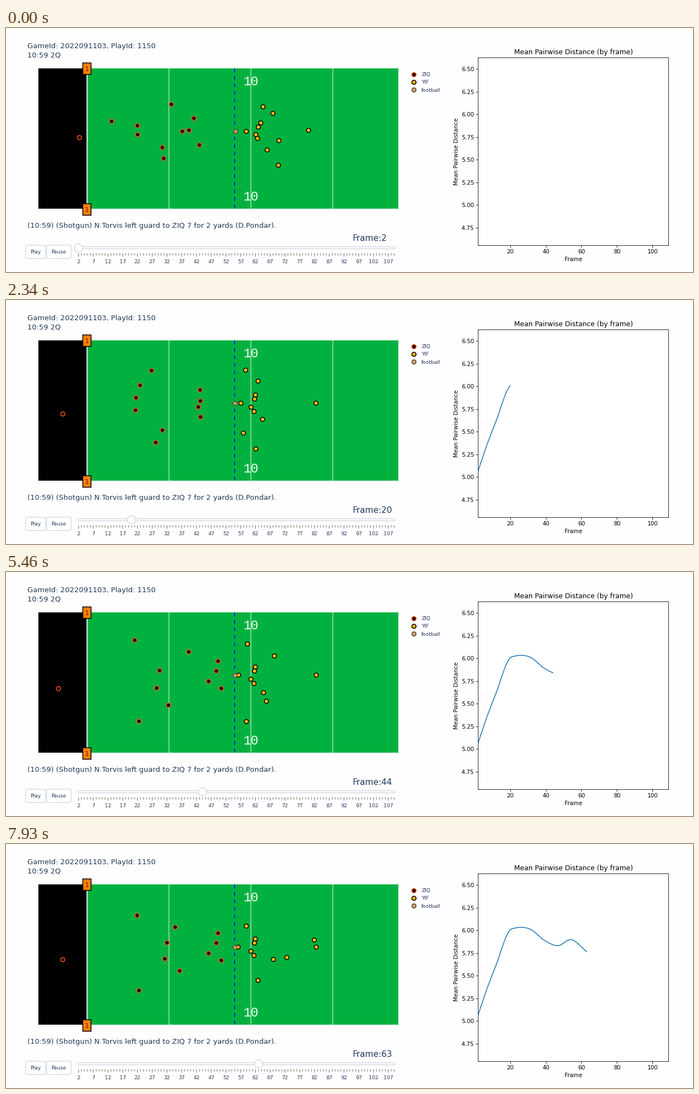
Animation of 1252 by 447 pixels, one loop 8 s. Source, as a matplotlib script:

```python
import numpy as np
import matplotlib.pyplot as plt
from matplotlib.animation import FuncAnimation
from matplotlib.patches import Circle, FancyBboxPatch, Rectangle

W, H, DPI = 1252, 447, 64
PX = 72 / DPI                     # points per pixel
SHIFT = 0.6                       # pixel alignment of the drawing
LOOP, TICK, HOLD = 8000, 50, 130  # loop, timer interval, time per pose (ms)

INK, RIM = "#22375a", "#bec8d9"
HOME = ("black", "#fb4f14")       # fill, outline
AWAY = ("#ffb612", "black")
BALL = ("#cba46f", "#5b4a33")

for key in ("font.size", "axes.linewidth", "axes.labelpad", "axes.titlepad",
            "lines.linewidth", "xtick.major.size", "xtick.major.width",
            "xtick.major.pad", "ytick.major.size", "ytick.major.width",
            "ytick.major.pad"):
    plt.rcParams[key] *= 1.162
plt.rcParams["font.family"] = "DejaVu Sans"

fig = plt.figure(figsize=(W / DPI, H / DPI), dpi=DPI, facecolor="#fefefe")
ax = fig.add_axes([0, 0, 1, 1])
ax.set(xlim=(SHIFT, W + SHIFT), ylim=(H + SHIFT, SHIFT))
ax.axis("off")


def text(x, y, s, size, color=INK, **kw):
    return ax.text(x, y, s, fontsize=size * PX, color=color, **kw)


def rect(x0, y0, x1, y1, fill, edge="none", lw=0, z=1):
    ax.add_patch(Rectangle((x0, y0), x1 - x0, y1 - y0, fc=fill, ec=edge,
                           lw=lw * PX, zorder=z))


def rounded(x, y, w, h, fill):
    ax.add_patch(FancyBboxPatch((x, y), w, h, fc=fill, ec=RIM, lw=0.9 * PX,
                                boxstyle="round,pad=0,rounding_size=1.6"))


def line(x0, y0, x1, y1, color, lw, **kw):
    ax.plot([x0, x1], [y0, y1], color=color, lw=lw * PX, snap=False, **kw)


def dots(xy, style):
    # one fill per dot keeps sub-pixel positions
    x, y = np.transpose(xy)
    return ax.scatter(x, y, s=(7.7 * PX) ** 2, c=[style[0]] * len(x),
                      edgecolors=style[1], linewidths=1.54 * PX, zorder=4)


def smooth(t, v, q):
    """Cubic Hermite curve through the points v at times t, read at q."""
    t, v = np.array(t, float), np.array(v, float).reshape(len(t), -1)
    m = np.gradient(v, t, axis=0)
    i = np.clip(np.searchsorted(t, q, side="right") - 1, 0, len(t) - 2)
    h = (t[i + 1] - t[i])[:, None]
    u = (q - t[i])[:, None] / h
    return ((1 + 2 * u) * (1 - u) ** 2 * v[i] + u * (1 - u) ** 2 * h * m[i]
            + u * u * (3 - 2 * u) * v[i + 1] + u * u * (u - 1) * h * m[i + 1])


step = np.arange(62)
number = step + 2


# Three ways to move: run a route, push forward, or drop into place
def route(*points):
    return smooth((0, 12, 36, 61), points, step)


def push(a, b, t0, t1):
    u = np.clip((step - t0) / (t1 - t0), 0, 1)[:, None]
    return np.array(a) + u * u * (3 - 2 * u) * np.subtract(b, a)


def settle(a, b, tau=5):
    return np.array(b) + np.exp(-step / tau)[:, None] * np.subtract(a, b)


home = np.array([
    route((193, 171.5), (220, 161.5), (329, 147), (309, 153)),
    route((240, 179.5), (232, 179.5), (274, 181), (294, 181.5)),
    route((240.5, 196), (232, 199.5), (269, 212.5), (290, 211)),
    route((302, 140.5), (277.5, 133), (238, 125), (239.5, 131.5)),
    route((285.5, 219.5), (285, 234), (292, 246), (317, 233)),
    route((288, 239.5), (281, 255.5), (246, 273.5), (243, 269)),
    route((134.5, 201.5), (111.5, 207), (96, 214), (104, 212.5)),
    push((343, 166), (387, 164), 8, 38),
    push((322, 190), (370, 201), 2, 30),
    push((334, 188), (384, 182), 2, 38),
    push((353, 215), (393, 214), 14, 42),
])
away = np.array([
    route((469, 145), (442.5, 132.5), (441, 129), (438.5, 151)),
    route((487, 157), (464.5, 151), (474, 150), (562.5, 176.5)),
    route((498, 207), (474.5, 216), (467, 223), (488, 212)),
    route((476.5, 224), (436.5, 240), (465, 243), (512.5, 208.5)),
    route((497, 252), (467.5, 268), (437, 278.5), (460, 250.5)),
    settle((465, 174.5), (455, 174.5)),
    settle((460.5, 182), (453.5, 182)),
    settle((456, 196), (447, 197)),
    settle((459, 203), (452.5, 205)),
    settle((438.5, 190), (423, 189.5), 18),
    settle((552, 188), (566, 189.5)),
])
ball = settle((419, 189.5), (417.3, 189.5), 14)[None]

# Field
TOP, BOTTOM = 74.5, 332
rect(60, TOP, 715.5, BOTTOM, "#00b140")
rect(60, TOP, 148, BOTTOM, "black")
for k in (1, 2, 3):
    line(148.3 + 149.3 * k, TOP, 148.3 + 149.3 * k, BOTTOM, "#f0faf3", 1)
line(148.3, TOP, 148.3, BOTTOM, "white", 1.8)
line(417.2, TOP, 417.2, BOTTOM, "blue", 1.54, ls=(0, (4.5, 4.5)))
for y in (97, 308):
    text(447, y, "10", 23.1, "white", ha="center", va="center_baseline",
         family="Liberation Mono")
for y in (75.5, 333.5):
    rect(141, y - 10.5, 156, y + 10.5, "#ff7f0e", "black", 1.5, 3)
    text(148.4, y + 4.2, "1", 11.5, "#4d2a0a", ha="center", zorder=4)

# Headings and legend
text(40, 37.4, "GameId: 2022091103, PlayId: 1150", 13.08)
text(40, 53.7, "10:59 2Q", 13.08)
text(40, 366.9, "(10:59) (Shotgun) N.Torvis left guard to ZIQ 7 for 2 yards (D.Pondar).",
     13.08)
for k, (name, style) in enumerate((("ZIQ", HOME), ("YIF", AWAY), ("football", BALL))):
    y = 85.5 + 14.1 * k
    dots([(743.5, y)], style)
    text(757.8, y + 3.4, name, 9.24)


# Buttons and slider
def slide(n):
    return 132.7 + (n - 2) * 5.376


for x, w, name in ((36.5, 36, "Play"), (74.5, 44.5, "Pause")):
    rounded(x, 398.5, w, 24.5, "white")
    text(x + w / 2, 413.8, name, 9.24, ha="center")
rounded(131, 401.3, 578.5, 4, "#f8fafc")
for n in range(2, 110):
    major = n % 5 == 2
    line(slide(n), 413.8, slide(n), 419 if major else 416.9, "#333333", 0.77)
    if major:
        text(slide(n), 431.3, str(n), 9.24, ha="center")

# Chart
chart = fig.add_axes([(861 - SHIFT) / W, 1 - 398 / H, 347 / W, 344 / H])
chart.set(xlim=(2, 109), ylim=(4.558, 6.626), xlabel="Frame",
          ylabel="Mean Pairwise Distance", title="Mean Pairwise Distance (by frame)",
          xticks=range(20, 101, 20), yticks=np.arange(4.75, 6.51, 0.25))
mean = smooth((2, 7, 12, 20, 23, 31, 40, 47, 54, 63),
              (5.07, 5.357, 5.613, 6.005, 6.026, 6.015, 5.88, 5.831, 5.898, 5.765),
              number)

# Moving parts
groups = [(dots(path[:, 0], style), path)
          for path, style in ((home, HOME), (away, AWAY), (ball, BALL))]
groups[-1][0].set_alpha(0.9)
knob = ax.add_patch(Circle((slide(2), 403.4), 7.5, fc="white", ec=RIM,
                           lw=0.9 * PX, zorder=5))
label = text(632, 390.2, "", 15.4)
curve, = chart.plot([], [], color="#1f77b4")


def update(i):
    k = min((i * TICK + TICK - 1) // HOLD, len(step) - 1)
    for group, path in groups:
        group.set_offsets(path[:, k])
    knob.center = slide(number[k]), 403.4
    label.set_text(f"Frame:{number[k]}")
    curve.set_data(number[:k + 1], mean[:k + 1, 0])
    return [group for group, _ in groups] + [knob, label, curve]


anim = FuncAnimation(fig, update, frames=LOOP // TICK, interval=TICK,
                     repeat=True, repeat_delay=0, blit=False)
plt.show()
```
